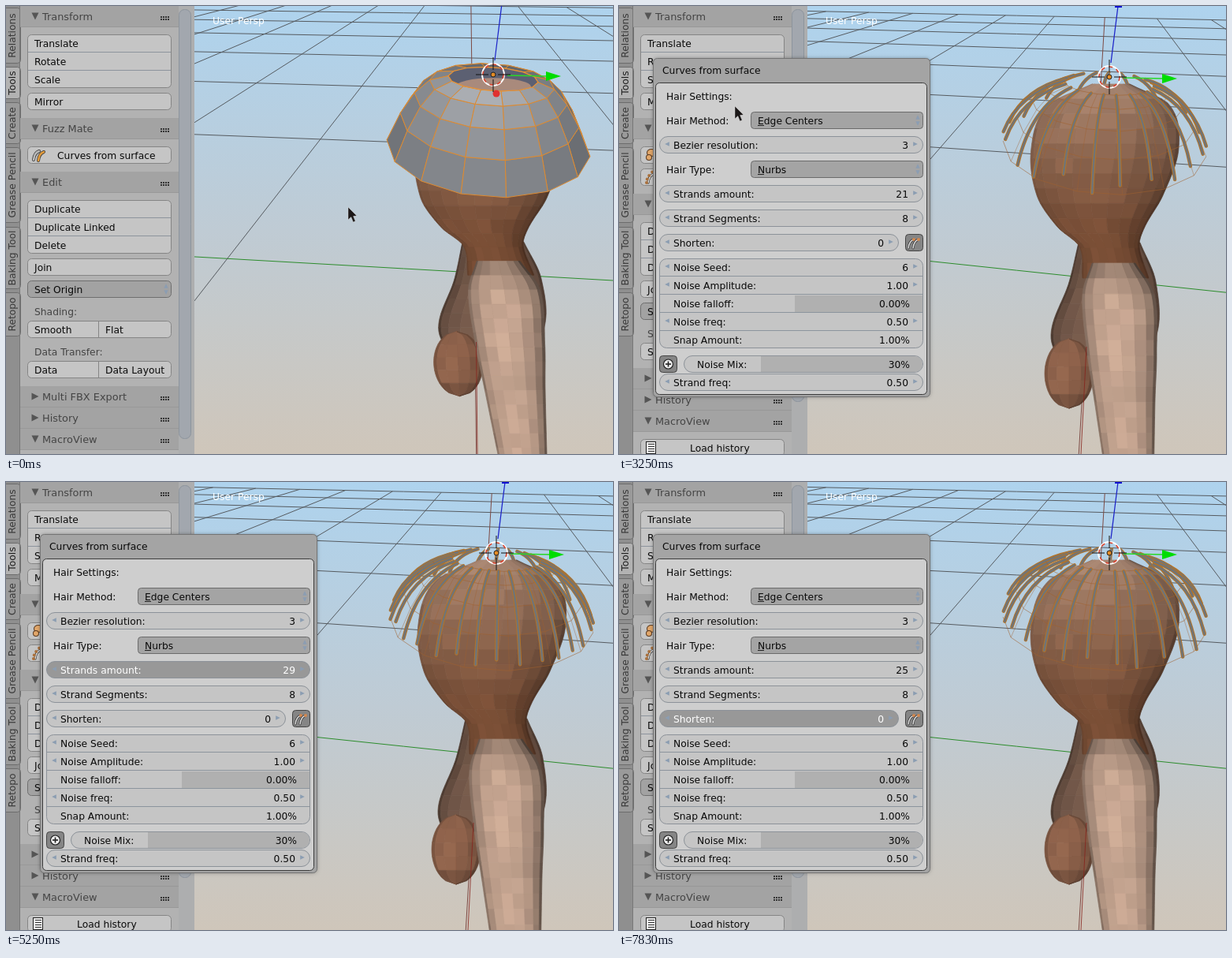
Animation of 770 by 568 pixels, one loop 8000 ms. Source, as an HTML page with a canvas:

```html
<!DOCTYPE html>
<html lang="en">
<head>
<meta charset="utf-8">
<title>Curves from surface</title>
<style>
html, body { margin: 0; width: 100%; height: 100%; overflow: hidden; }
canvas { display: block; }
</style>
</head>
<body>
<canvas id="stage" width="770" height="568"></canvas>
<script>
const c = document.getElementById('stage').getContext('2d');
const TAU = Math.PI * 2, LOOP = 8000, FPS = 12;
const lerp = (a, b, u) => a + (b - a) * u;
const clamp = (v, a, b) => Math.max(a, Math.min(b, v));
const range = n => [...Array(n).keys()];
const rand = n => { const s = Math.sin(n * 127.1 + 3.7) * 43758.5453; return s - Math.floor(s); };
const rgb = (col, m = 1) => `rgb(${col.map(v => Math.round(clamp(v * m, 0, 255)))})`;

// Pointer stops: frame, x, y.
const stops = [[0, 434, 256], [3, 434, 256], [6, 150, 182], [13, 150, 182], [23, 111, 82], [35, 114, 86],
  [48, 221, 223], [57, 232, 238], [79, 232, 238], [87, 206, 296], [96, 198, 300]];

let frame = 0, k = 0, pointer = [0, 0], hoverOn = true;

function pointerAt(f) {
  const i = stops.findIndex(p => p[0] > f), a = stops[i - 1], b = stops[i];
  const u = (f - a[0]) / (b[0] - a[0]);
  return [1, 2].map(n => Math.round(lerp(a[n], b[n], u)));
}
// Dragged up to 30 and back down to 25.
const strandCount = f => 21 + Math.min(8, 3 * clamp(f - 60, 0, 3)) + (f >= 66) - clamp(f - 69, 0, 3) - clamp(f - 74, 0, 2);

// ---------- drawing helpers ----------
function trace(pts) { c.beginPath(); pts.forEach(p => c.lineTo(...p)); }
function line(pts, stroke, w = 1, close = false) {
  trace(pts);
  if (close) c.closePath();
  c.strokeStyle = stroke; c.lineWidth = w; c.stroke();
}
function poly(pts, fill, stroke, w = 1) {
  trace(pts); c.closePath();
  c.fillStyle = fill; c.fill();
  if (stroke) { c.strokeStyle = stroke; c.lineWidth = w; c.stroke(); }
}
function dot(x, y, rx, fill, ry = rx) {
  c.beginPath(); c.ellipse(x, y, rx, ry, 0, 0, TAU);
  c.fillStyle = fill; c.fill();
}
function ring(x, y, r, stroke, w) {
  c.beginPath(); c.arc(x, y, r, 0, TAU);
  c.strokeStyle = stroke; c.lineWidth = w; c.stroke();
}
function box(x, y, w, h, r, fill, stroke) {
  c.beginPath(); c.roundRect(x + .5, y + .5, w - 1, h - 1, r);
  c.fillStyle = fill; c.fill();
  if (stroke) { c.strokeStyle = stroke; c.lineWidth = 1; c.stroke(); }
}
function rect(x, y, w, h, fill) { c.fillStyle = fill; c.fillRect(x, y, w, h); }
function text(s, x, y, col = '#0a0a0a', align = 'left', size = 12.3) {
  c.font = size + 'px "DejaVu Sans", sans-serif';
  c.textAlign = align; c.textBaseline = 'alphabetic';
  c.fillStyle = col; c.fillText(s, x, y + 4.5);
}

// ---------- viewport ----------
// Small view rotation; k runs from 1 (start) to 0 (settled).
const view = (x, y) => [x + k * (-4 + Math.max(0, y - 300) * .04),
  y + k * (y < 240 ? (y - 190) * .07 : 3.5 - (y - 240) * .07)];

// Ground plane: rows are evenly spaced in 1 / (distance below the horizon).
function grid() {
  const hz = lerp(-66, -75, k), vx = lerp(621, 589, k);
  const left = j => hz + 1 / (lerp(.00268, .002545, k) + j * lerp(.00159, .00166, k));
  const right = j => hz + 1 / (lerp(.00233, .002364, k) + j * lerp(.00137, .00151, k));
  for (const j of range(8)) line([[239, left(j)], [770, right(j)]], j ? '#565b60' : '#2c8c2c');
  const slope = (right(7) - left(7)) / 531;
  for (let i = -7; i < 8; i++) {
    const d = (lerp(-5, 1, k) + i * lerp(68, 66.5, k)) / 84;
    const far = (left(7) + (vx - 239) * slope - hz) / (1 - d * slope);
    line([[vx + d * far, hz + far], [vx + d * 700, hz + 700]], i ? '#565b60' : '#7d4a44');
  }
}

// Smooth left and right edges through rows of [y, left, right].
function edges(rows) {
  return y => [1, 2].map(n => {
    const i = clamp(rows.findIndex(r => r[0] >= y), 1, rows.length - 1), h = rows[i][0] - rows[i - 1][0];
    const tangent = j => {
      const a = rows[Math.max(0, j - 1)], b = rows[Math.min(rows.length - 1, j + 1)];
      return (b[n] - a[n]) / (b[0] - a[0]) * h;
    };
    const u = (y - rows[i - 1][0]) / h, s = u * u * (3 - 2 * u);
    return lerp(rows[i - 1][n], rows[i][n], s) + u * (1 - u) * ((1 - u) * tangent(i - 1) - u * tangent(i));
  });
}
function loft(top, end, side, cols, shade) {
  const bands = Math.ceil((end - top) / 20), fine = 4;
  const at = (y, u) => view(lerp(...side(y), (1 - Math.cos(u * Math.PI)) / 2), y);
  for (const r of range(bands)) for (const q of range(cols)) {
    const y = v => lerp(top, end, (r + v) / bands), u = q / cols, w = (q + 1) / cols;
    const down = range(fine + 1).map(i => at(y(i / fine), u));
    const up = range(fine + 1).map(i => at(y(1 - i / fine), w));
    const col = rgb(shade((u + w) / 2, y(.5)), .95 + .1 * rand(r * 31 + q + cols));
    poly([...down, ...up], col, col, .7);
  }
}
const lit = (col, m) => col.map(v => v * m);
const falloff = (u, peak, amount) => 1.03 - amount * (u - peak) ** 2;

function body() {
  loft(300, 475, edges([[300, 583, 661], [350, 571, 681], [420, 548, 681], [475, 575, 640]]), 10,
    u => lit([124, 95, 79], falloff(u, .5, 2)));
  loft(422, 510, y => { const w = 31 * Math.sqrt(Math.max(0, 1 - ((y - 466) / 44) ** 2)); return [571 - w, 571 + w]; }, 6,
    (u, y) => lit([142, 98, 75], falloff(u, .42, 1.3) * (y > 490 ? .84 : 1)));
  const skin = (u, y) => {
    const v = clamp((y - 99) / 190, 0, 1) ** .7;
    return lit([lerp(172, 118, v), lerp(139, 76, v), lerp(119, 52, v)], falloff(u, .4, 1.25));
  };
  loft(99, 345, edges([[99, 600, 648], [125, 545, 698], [180, 523, 710], [240, 530, 690], [280, 556, 667],
    [305, 584, 660], [345, 588, 672]]), 11, skin);
  loft(326, 620, edges([[326, 600, 655], [365, 588, 679], [440, 594, 682], [500, 603, 680], [620, 621, 678]]), 8,
    (u, y) => lit([194, 162, 142], falloff(u, .45, 2.2) * Math.min(1, .72 + (y - 326) / 140)));
  line([[lerp(593, 596.5, k), lerp(432, 426, k)], [lerp(586, 598, k), 568]], 'rgba(134,34,28,.8)');
}

// A point on the cap: t from 0 (opening) to 1 (rim), angle a from the front.
const capPoint = (t, a) => {
  const s = (57 + 72 * t ** .85) * Math.sin(a);
  return [622 - 6 * t + s, 99 + 82 * t ** 1.8 + (14 + 44 * t) * Math.cos(a) + s * .055];
};
const capView = (t, a) => view(...capPoint(t, a));
const SEG = 14, segAngle = i => .175 + i * TAU / SEG;

function cap() {
  const order = range(SEG).sort((a, b) => Math.cos(segAngle(a + .5)) - Math.cos(segAngle(b + .5)));
  for (const i of order) for (const r of [3, 2, 1, 0]) {
    const a = segAngle(i), b = segAngle(i + 1), t = r / 4, e = t + .25;
    const g = (172 - 52 * t) * (.78 + .22 * Math.cos((a + b) / 2 + .15));
    poly([capView(t, a), capView(t, b), capView(e, b), capView(e, a)], rgb([g, g + 3, g + 8]), '#dd8b32');
  }
  const rim = range(SEG).map(i => capView(0, segAngle(i)));
  poly(rim, '#5c6072');
  c.save();
  trace(rim); c.clip();
  dot(...view(622, 108), 48, '#a98a7c', 11);
  c.restore();
  line(rim, '#e89336', 1.2, true);
}

function capWire() {
  const col = 'rgba(160,98,48,.7)', levels = range(5).map(r => r / 4);
  for (const t of levels) line(range(8).map(i => capView(t, segAngle(i - 4))), col, .8);
  for (const i of range(7)) line(levels.map(t => capView(t, segAngle(i - 3))), col, .6);
}

// Evenly spread strands with a seeded wobble in angle and length.
function strands(n, front) {
  c.lineCap = 'round';
  for (const i of range(n)) {
    const a = -.15 + (i + .3 * (rand(n * 17 + i) - .5)) * TAU / n;
    if (Math.cos(a) > -.1 !== front) continue;
    const root = capPoint(0, a), tip = capPoint(1, a);
    tip[1] -= 18 * rand(n + i * 5);
    const bend = [lerp(tip[0], root[0], .25), lerp(tip[1], root[1], .75)];
    for (const [col, w] of [['#b87322', 4.4], ['#717476', 2.7]]) {
      c.beginPath(); c.moveTo(...root); c.quadraticCurveTo(...bend, ...tip);
      c.strokeStyle = col; c.lineWidth = w; c.stroke();
    }
  }
  c.lineCap = 'butt';
}

function gizmo() {
  c.save();
  c.translate(622 - 4 * k, 90 - 3 * k);
  line([[2, -18], [11, -90]], '#1b22c8', 1.2);
  if (k < .5) rect(7, -92, 9, 4, '#1010d0');
  line([[18, 1], [70, 2]], '#28d828', 1.4);
  poly([[67, -4], [86, 2], [67, 8]], '#00dd00');
  if (k > .5) dot(4, 24, 4.5, '#e03030');
  ring(0, 0, 14, '#fff', 2);
  c.setLineDash([5, 5]); ring(0, 0, 13, '#d8432f', 1.6); c.setLineDash([]);
  for (const q of range(4)) { c.rotate(Math.PI / 2); line([[6, 0], [22, 0]], '#111'); }
  dot(0, 0, 3, '#e38b25'); ring(0, 0, 3, '#222', 1);
  c.restore();
}

function viewport(hair, n) {
  const g = c.createLinearGradient(0, 0, 0, 568);
  g.addColorStop(0, '#aed3ee'); g.addColorStop(.5, '#bfcbd4'); g.addColorStop(1, '#cfc6ba');
  rect(239, 0, 531, 568, g);
  grid();
  if (hair) strands(n, false);
  body();
  if (hair) { capWire(); strands(n, true); } else cap();
  gizmo();
  text('User Persp', 262, 18, '#fff');
}

// ---------- interface ----------
const EDGE = '#858585', BLUE = '#8b9db2', FACE = '#c5c5c5', HOT = '#d8d8d8';
const over = (x, y, w, h) => hoverOn && pointer[0] >= x && pointer[0] < x + w && pointer[1] >= y && pointer[1] < y + h;

// Triangle turned by q quarter turns; q = 0 points down.
function tri(x, y, q, col, s = 4) {
  c.save(); c.translate(x, y); c.rotate(q * Math.PI / 2);
  poly([[-s, -s], [s, -s], [0, s]], col);
  c.restore();
}
function updown(y, x) { tri(x, y - 4, 2, BLUE, 2.7); tri(x, y + 4, 0, BLUE, 2.7); }
function header(y, label, open = true) {
  rect(18, y - 13, 201, 26, '#a3a3a3');
  rect(18, y + 13, 201, 1, '#989898');
  tri(37, y, open ? 0 : 3, '#555', 4.5);
  text(label, 46, y, '#444', 'left', 12.9);
  for (const i of range(8)) rect(196 + i % 4 * 3, y + (i > 3 ? 3 : 0), 2, 2, '#333');
}
function group(y, labels) {
  box(27, y, 183, labels.length * 23 - 1, 5, FACE, EDGE);
  labels.forEach((s, i) => {
    const top = y + i * 23;
    if (over(28, top, 181, 23)) box(28, top, 181, 22, 4, HOT);
    if (i) rect(28, top - 1, 181, 1, '#8d949d');
    text(s, 36, top + 11);
  });
}
function iconButton(y, label, x, pressed) {
  box(27, y, 183, 22, 5, pressed ? '#646464' : over(28, y, 181, 22) ? HOT : FACE, pressed ? '#444' : EDGE);
  text(label, x, y + 11, pressed ? '#fff' : undefined);
}
function pair(y, a, b) {
  box(27, y, 183, 22, 5, FACE, EDGE);
  rect(117, y + 1, 1, 20, EDGE);
  text(a, 36, y + 11); text(b, 126, y + 11);
}
function curl(x, y, col, w = 2.6) {
  c.lineCap = 'round';
  for (const [stroke, width] of [['#333', w + 1.4], [col, w]]) {
    c.beginPath(); c.moveTo(x, y + 6); c.quadraticCurveTo(x + 1, y - 3, x + 7, y - 5);
    c.strokeStyle = stroke; c.lineWidth = width; c.stroke();
  }
  c.lineCap = 'butt';
}

function tabs() {
  rect(0, 0, 18, 568, '#8f8f8f');
  [['Relations', 2, 73], ['Tools', 77, 118], ['Create', 122, 175], ['Grease Pencil', 179, 275],
    ['Baking Tool', 280, 359], ['Retopo', 363, 419]].forEach(([s, a, b], i) => {
    box(-5, a, 24, b - a, 4, i === 1 ? '#b2b2b2' : '#9a9a9a', '#6c6c6c');
    c.save(); c.translate(7, (a + b) / 2); c.rotate(-Math.PI / 2);
    text(s, 0, 0, i === 1 ? '#222' : '#3a3a3a', 'center'); c.restore();
  });
  rect(17, 0, 1, 568, '#777');
}

function sidebar(hair) {
  rect(18, 0, 221, 568, '#b2b2b2');
  tabs();
  rect(219, 0, 20, 568, '#adaeaf');
  box(219, 4, 16, hair ? 498 : 545, 7, '#a2a7ae', '#8c949d');
  header(13, 'Transform');
  group(36, ['Translate', 'Rotate', 'Scale']);
  group(110, ['Mirror']);
  header(155, 'Fuzz Mate');
  if (hair) {
    iconButton(178, 'Generate ribbons', 73);
    dot(41, 186, 6, '#5a3a20', 5); dot(41, 186, 5, '#e2a76a', 4);
    dot(38, 192, 4, '#5a3a20'); dot(38, 192, 3, '#e2a76a');
    iconButton(206, 'Change Cure radius pro...', 47);
    curl(37, 218, '#ddd', 1.6);
    for (const i of range(4)) dot(35 + i * i * .8, 224 - i * 4.5, 2, '#a9703c');
  } else {
    iconButton(178, 'Curves from surface', 65, frame >= 10);
    curl(35, 189, '#b8b8b8'); curl(41, 190, '#e09a3c');
  }
  const down = hair ? 28 : 0, shift = hair ? -23 : 0;
  header(223 + down, 'Edit');
  group(246 + down, ['Duplicate', 'Duplicate Linked', 'Delete']);
  group(320 + down, ['Join']);
  box(27, 348 + down, 183, 22, 5, '#a2a2a2', '#6e6e6e');
  text('Set Origin', 36, 359 + down); updown(359 + down, 203);
  text('Shading:', 36, 387 + down, '#444');
  pair(399 + down, 'Smooth', 'Flat');
  if (!hair) {
    text('Data Transfer:', 36, 438, '#444');
    pair(450, 'Data', 'Data Layout');
  }
  header(495 + shift, 'Multi FBX Export', false);
  header(522 + shift, 'History', false);
  header(549 + shift, 'MacroView');
  if (hair) {
    iconButton(549, 'Load history', 90);
    rect(34, 552, 13, 16, '#222'); rect(35, 553, 11, 14, '#eee');
    for (const i of range(4)) rect(37, 555 + i * 3, 8, 1, '#333');
  }
}

function choice(y, label, value) {
  text(label, 60, y);
  box(167, y - 11, 219, 22, 4, over(167, y - 11, 218, 22) ? '#b6b6b6' : '#a4a4a4', '#6b6b6b');
  text(value, 176, y);
  rect(176, y + 6, 8, 1, '#222');
  updown(y, 379);
}
function field(y, label, value, { x = 51, w = 335, pressed = false, joined = false, arrows = true, fill = 0, lx = 69 } = {}) {
  const hot = over(x, y - 11, w, 22), ink = pressed ? '#fff' : undefined;
  const col = pressed ? '#989898' : hot ? HOT : FACE;
  if (!joined) box(x, y - 11, w, 22, 10.5, col, '#8c9299');
  else if (hot) rect(x + 1, y - 11, w - 2, 22, col);
  if (fill) {
    c.save();
    c.beginPath(); c.roundRect(x + 1, y - 10, w - 2, joined ? 21 : 20, joined ? 0 : 10); c.clip();
    rect(fill, y - 11, x + w - fill, 23, '#b0b0b0');
    c.restore();
  }
  if (arrows) { tri(x + 10, y - 1, 1, BLUE, 2.8); tri(x + w - 10, y - 1, 3, BLUE, 2.8); }
  text(label, lx, y, ink);
  text(value, x + w - (arrows ? 19 : 17), y, ink, 'right');
}
const iconBox = (x, y) => box(x, y, 23, 22, 4, '#858585', '#444');

function popup(n) {
  c.save();
  c.shadowColor = 'rgba(0,0,0,.35)'; c.shadowBlur = 5;
  box(43, 66, 352, 430, 5, '#a4a4a4');
  c.restore();
  box(43, 66, 352, 430, 5, '#a4a4a4', '#747474');
  box(46, 97, 345, 396, 5, '#cecece', '#3c3c3c');
  text('Curves from surface', 55, 81);
  text('Hair Settings:', 60, 114);
  choice(145, 'Hair Method:', 'Edge Centers');
  field(176, 'Bezier resolution:', '3');
  choice(207, 'Hair Type:', 'Nurbs');
  field(238, 'Strands amount:', n, { pressed: frame >= 58 && frame < 80 });
  field(269, 'Strand Segments:', '8');
  field(300, 'Shorten:', '0', { w: 304, pressed: frame >= 94 });
  iconBox(363, 289);
  for (const x of [367, 373]) { curl(x, 301, '#ddd', 1.5); dot(x + 7, 296, 2, '#d48a52'); }
  box(51, 320, 335, 114, 9, FACE, '#8c9299');
  [['Noise Seed:', '6'], ['Noise Amplitude:', '1.00'], ['Noise falloff:', '0.00%', { arrows: false, fill: 223 }],
    ['Noise freq:', '0.50'], ['Snap Amount:', '1.00%', { arrows: false }]].forEach(([s, v, o], i) => {
    field(331 + i * 23, s, v, { joined: true, ...o });
    if (i) rect(52, 319 + i * 23, 333, 1, '#8c949d');
  });
  iconBox(51, 443);
  dot(62.5, 454, 6, '#eee'); ring(62.5, 454, 6, '#222', 1.2);
  rect(59, 453.2, 7, 1.6, '#222'); rect(61.7, 450.5, 1.6, 7, '#222');
  field(454, 'Noise Mix:', '30%', { x: 82, w: 304, arrows: false, fill: 180, lx: 99 });
  field(477, 'Strand freq:', '0.50');
}

function arrow() {
  const shape = [[0, 0], [0, 16], [3.8, 12.6], [6.4, 19], [9.2, 17.8], [6.6, 11.6], [11, 11]];
  poly(shape.map(([x, y]) => [pointer[0] + x, pointer[1] + y - 1]), '#1c1818', 'rgba(235,235,235,.5)', .8);
}

function draw() {
  k = Math.max(0, 1 - frame / 3);
  pointer = pointerAt(frame);
  const hair = frame >= 13, open = frame >= 35, n = strandCount(frame);
  const dragging = frame >= 59 && frame < 80 || frame >= 94;
  viewport(hair, n);
  hoverOn = !open;
  sidebar(hair);
  hoverOn = !dragging;
  if (open) popup(n);
  if (!dragging) arrow();
}

let shown = -1;
function tick() {
  const t = performance.now() % LOOP;
  frame = Math.min(95, Math.floor((t + 5) * FPS / 1000));
  if (frame !== shown) { shown = frame; draw(); }
  requestAnimationFrame(tick);
}
tick();
</script>
</body>
</html>
```
